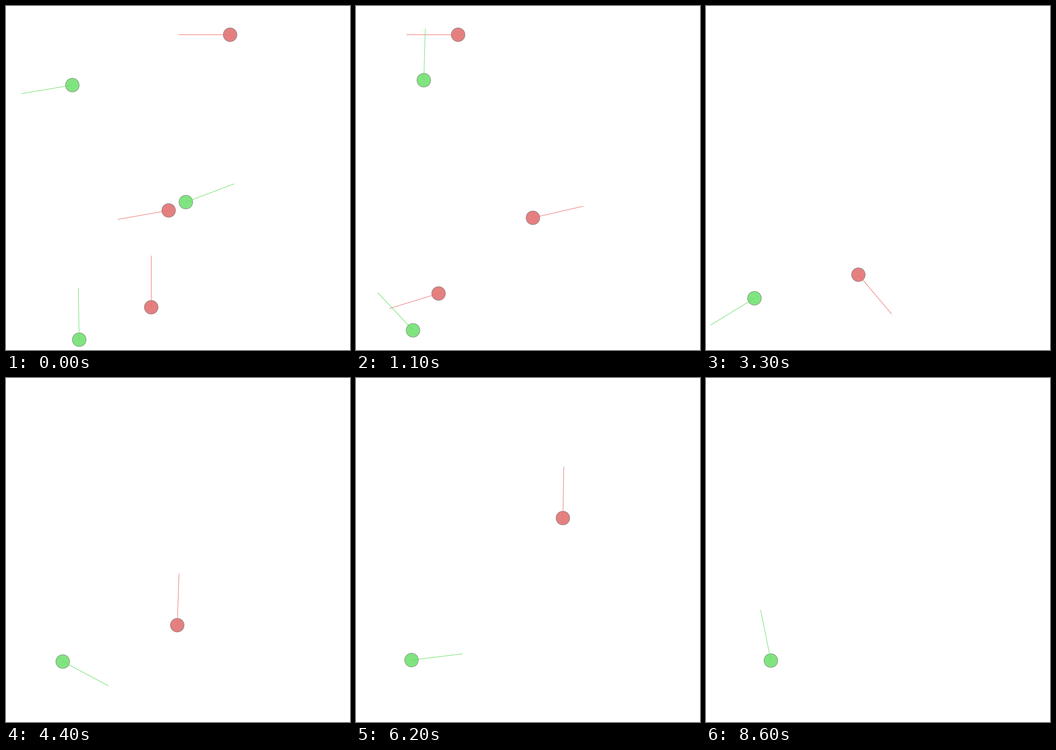
A matplotlib script that plays this animation: 700x700 px, repeating every 8.7 s.

```python
import numpy as np
import matplotlib.pyplot as plt
from matplotlib.animation import FuncAnimation
from matplotlib.patches import Circle

SIZE, DPI = 700, 100
FRAMES, STEP = 87, 100
RADIUS, REACH = 14, 105
PX = 72 / DPI

# fill, ray, curve speed in pixels per step
RED = ("#e48080", "#ec7070", 10)
GREEN = ("#80e480", "#66e066", 1.5)

fig = plt.figure(figsize=(SIZE / DPI, SIZE / DPI), dpi=DPI, facecolor="white")
ax = fig.add_axes([0, 0, 1, 1])
ax.set_xlim(0, SIZE)
ax.set_ylim(SIZE, 0)
ax.axis("off")


def leg(start, end, speed):
    """Steady turn from one pose to the next, curving along the heading."""
    n = end[0] - start[0]
    heading = np.radians(np.linspace(start[3], end[3], n + 1))
    arc = np.cumsum(speed * np.exp(-1j * heading))
    arc -= np.linspace(arc[0], arc[-1], n + 1)
    line = np.linspace(complex(*start[1:3]), complex(*end[1:3]), n + 1)
    return line + arc, heading


class Walker:
    """Poses are (step, x, y, heading in degrees); gone after the last."""

    def __init__(self, style, *poses):
        fill, ray, speed = style
        self.path, self.heading = [], []
        for start, end in zip(poses, poses[1:]):
            path, heading = leg(start, end, speed)
            self.path[start[0]:] = path
            self.heading[start[0]:] = heading
        self.disc = Circle((0, 0), RADIUS, fc=fill, ec="#777777",
                           lw=0.8 * PX, zorder=2)
        ax.add_patch(self.disc)
        self.ray, = ax.plot([], [], color=ray, lw=PX, zorder=3, snap=False,
                            solid_capstyle="butt")

    def place(self, i):
        alive = i < len(self.path)
        self.disc.set_visible(alive)
        self.ray.set_visible(alive)
        if alive:
            p = self.path[i]
            tip = p + REACH * np.exp(-1j * self.heading[i])
            self.disc.center = p.real, p.imag
            self.ray.set_data([p.real, tip.real], [p.imag, tip.imag])


walkers = [
    Walker(RED, (0, 456, 58.5, 180), (16, 95, 58.5, 180),
           (23, 103.5, 94, 446), (28, 110, -10, 446)),
    Walker(RED, (0, 331, 416, 190), (11, 360, 431, 373), (23, 368, 475, 185),
           (44, 348.5, 503, 448), (50, 386, 466, 375), (62, 421, 285, 449),
           (76, 429, 141, 433), (84, 434, -6, 450)),
    Walker(RED, (0, 295.5, 613, 90), (11, 168, 585, 197), (19, -10, 638, 197)),
    Walker(GREEN, (0, 135, 161, 189.5), (11, 138, 151, 88.4),
           (19, -8, 140, 180)),
    Walker(GREEN, (0, 366, 399, 20.7), (4, 428, 376, 10), (9, 385, 402, 200)),
    Walker(GREEN, (0, 149, 679, 91), (11, 116, 660, 133), (23, 97, 627, 462),
           (44, 115.5, 577, 692), (62, 113, 574, 367), (76, 142, 618, 256),
           (86, 132, 575, 101.5)),
]


def draw(i):
    for w in walkers:
        w.place(i)
    return [part for w in walkers for part in (w.disc, w.ray)]


anim = FuncAnimation(fig, draw, frames=FRAMES, interval=STEP, repeat=True,
                     repeat_delay=0, blit=False)
plt.show()
```
